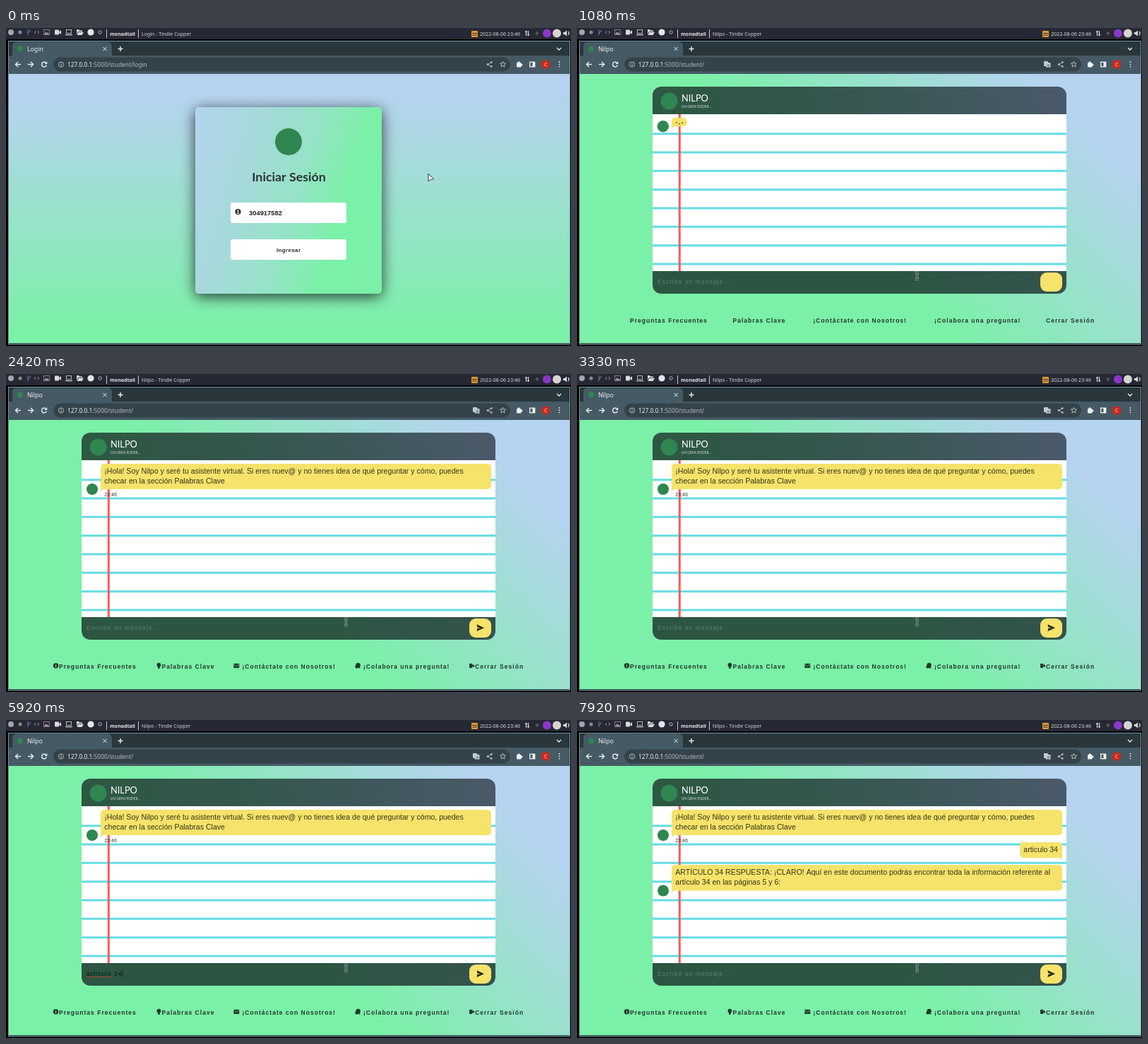
Write an HTML page with a canvas that moves like this. It is 800x450 px and loops after 8 s.

```html
<!DOCTYPE html>
<html lang="es">
<head>
<meta charset="utf-8">
<title>Chat</title>
<style>
html, body { margin: 0; width: 100%; height: 100%; overflow: hidden; background: #000; }
canvas { display: block; width: 100vw; height: 100vh; }
</style>
</head>
<body>
<canvas id="stage" width="800" height="450"></canvas>
<script>
const ctx = document.getElementById('stage').getContext('2d');
const LOOP = 8000;
const SANS = '"Liberation Sans", Arial, sans-serif';
const UI = '"Noto Sans", sans-serif';
const HAND = 'Lato, sans-serif';
const GREEN = '#7bf0a8', BLUE = '#b6d3ef', YELLOW = '#f5e36b', LOGO = '#2f8650', INK = '#20382c';
const BOT = 'Nilpo', BROWSER = 'Tindle Copper';

// Scene times in ms
const T = { page: 670, loader: 920, icons: 1250, hello: 1920, focus: 2580, send: 6000, wait: 6120, reply: 6550 };
const TYPED = 'articulo 34';
const KEYS = [3420, 3740, 5000, 5080, 5170, 5250, 5330, 5420, 5500, 5580, 5700];

// Elastic pop of a new bubble: [progress, scale]
const POP = [[0, 0], [.047, .45], [.094, .883], [.141, 1.141], [.187, 1.212], [.243, 1.151],
  [.299, 1.048], [.355, .979], [.41, .961], [.52, .991], [.63, 1.007], [.855, .999], [1, 1]];

function pop(age) {
  const p = Math.min(age / 500, 1);
  const i = Math.max(1, POP.findIndex(k => k[0] >= p));
  const [a, u] = POP[i - 1], [b, v] = POP[i];
  return u + (v - u) * (p - a) / (b - a);
}

function rect(x, y, w, h, fill, r = 0) {
  ctx.fillStyle = fill;
  ctx.beginPath();
  ctx.roundRect(x, y, w, h, r);
  ctx.fill();
}

function dot(x, y, r, fill) {
  ctx.fillStyle = fill;
  ctx.beginPath();
  ctx.arc(x, y, r, 0, 7);
  ctx.fill();
}

function ring(x, y, r, color, width = 1) {
  ctx.strokeStyle = color;
  ctx.lineWidth = width;
  ctx.beginPath();
  ctx.arc(x, y, r, 0, 7);
  ctx.stroke();
}

function trace(points) {
  ctx.beginPath();
  for (let i = 0; i < points.length; i += 2) ctx.lineTo(points[i], points[i + 1]);
}

function poly(points, fill) {
  trace(points);
  ctx.fillStyle = fill;
  ctx.fill();
}

function line(points, color, width = 1) {
  trace(points);
  ctx.strokeStyle = color;
  ctx.lineWidth = width;
  ctx.stroke();
}

function text(str, x, y, font, fill, spacing = 0) {
  ctx.font = font;
  ctx.letterSpacing = spacing + 'px';
  ctx.fillStyle = fill;
  ctx.fillText(str, x, y);
  const width = ctx.measureText(str).width;
  ctx.letterSpacing = '0px';
  return width;
}

function gradient(x0, y0, x1, y1, stops) {
  const g = ctx.createLinearGradient(x0, y0, x1, y1);
  stops.forEach(([p, c]) => g.addColorStop(p, c));
  return g;
}

function drawBar(title) {
  const grey = '#b4b7c0', pale = '#d9dbe0';
  rect(0, 0, 800, 16, '#262833');
  dot(7, 6, 4, '#a3a6ae');
  dot(20, 6, 2.6, '#85888f');
  line([31, 2, 31, 10], '#6f86bb');
  line([31, 7, 34, 5, 34, 3], '#6f86bb');
  line([42, 4, 40.5, 6, 42, 8], grey, .8);
  line([45, 4, 46.5, 6, 45, 8], grey, .8);
  ctx.strokeStyle = '#9d8f9c';
  ctx.strokeRect(53.5, 2.5, 8, 7);
  poly([54, 9, 56.5, 5, 58, 7, 59, 6, 61, 9], '#9d8f9c');
  rect(69, 2.5, 6, 7, pale, 1);
  poly([75, 5.5, 78, 3, 78, 9, 75, 6.5], pale);
  ctx.strokeStyle = pale;
  ctx.strokeRect(85.5, 2.5, 7, 5);
  rect(84, 9, 10, 1.2, pale);
  poly([100, 2, 103, 2, 104, 3.5, 108, 3.5, 108, 5, 102, 5, 100, 9], pale);
  poly([102.5, 5.8, 110, 5.8, 107.5, 10, 100.5, 10], pale);
  dot(120, 6, 4.6, '#e4e5e8');
  ring(133, 6, 2.2, grey);
  line([142.5, 2, 142.5, 14], '#c9cbd0');
  text('monadtall', 147, 10.5, 'bold 7px ' + UI, '#e4e5e8');
  line([187.5, 2, 187.5, 14], '#c9cbd0');
  text(title + ' - ' + BROWSER, 192, 10.5, '7px ' + UI, '#d3d5da');

  rect(659, 4, 9, 9, '#d99a3c', 1);
  rect(660, 7, 7, 1, '#4a3520');
  rect(660, 9.5, 7, 1, '#4a3520');
  text('2022-08-06 23:46', 671, 10.5, '7.1px ' + UI, '#d9dbe0');
  line([736.5, 11, 736.5, 5], pale, 1.2);
  poly([734.5, 6, 736.5, 3.5, 738.5, 6], pale);
  line([739.5, 4, 739.5, 10], pale, 1.2);
  poly([737.8, 9, 739.5, 11.5, 741.5, 9], pale);
  dot(752, 7.5, 2.4, '#50535e');
  dot(766, 7.5, 6, '#8937c8');
  dot(780, 7.5, 6, '#d7d5d2');
  poly([789, 6, 791, 6, 794, 3.5, 794, 11.5, 791, 9, 789, 9], pale);
  ctx.strokeStyle = pale;
  ctx.beginPath();
  ctx.arc(794, 7.5, 3, -1, 1);
  ctx.stroke();
}

function drawBrowser(tab, path, translate) {
  const white = '#eef2f3', soft = '#c0cacf';
  rect(3, 18, 796, 430, '#7398a8');
  rect(4, 19, 794, 428, '#29373d');
  rect(9, 19.5, 141, 24, '#455a64', [6, 6, 0, 0]);
  rect(4, 39, 794, 26, '#455a64');
  dot(20, 29.5, 4, LOGO);
  text(tab, 30, 32.5, '8.7px ' + UI, white);
  line([137.5, 27, 142.5, 32], white);
  line([142.5, 27, 137.5, 32], white);
  line([158.5, 29.5, 165.5, 29.5], white, 1.4);
  line([162, 26, 162, 33], white, 1.4);
  line([780, 28, 783, 31, 786, 28], white, 1.3);

  line([21, 51.5, 13.5, 51.5], white, 1.4);
  line([17, 48, 13.5, 51.5, 17, 55], white, 1.4);
  line([31, 51.5, 38.5, 51.5], white, 1.4);
  line([35, 48, 38.5, 51.5, 35, 55], white, 1.4);
  ctx.beginPath();
  ctx.arc(54, 51.5, 3.4, .3, 5.4);
  ctx.stroke();
  poly([58.2, 47.2, 58.2, 51, 54.4, 51], white);

  rect(67, 41.5, 647, 20, '#34434a', 10);
  ring(78, 51.5, 3.6, soft, .9);
  rect(77.5, 51, 1, 2.6, soft);
  rect(77.5, 49.2, 1, 1, soft);
  const host = text('127.0.0.1', 87, 54.5, '8.35px ' + UI, white);
  text(':5000' + path, 87 + host, 54.5, '8.35px ' + UI, '#b0bbc0');

  if (translate) {
    rect(661, 47, 6, 7, soft, 1);
    rect(664, 49, 6.5, 7, soft, 1);
    text('文', 664.8, 54.5, '5px "Noto Sans CJK SC", "Noto Sans CJK", sans-serif', '#34434a');
  }
  line([687.5, 48.5, 682, 51.5, 687.5, 54.5], soft, .9);
  dot(687.3, 48.5, 1.3, soft);
  dot(682, 51.5, 1.3, soft);
  dot(687.3, 54.5, 1.3, soft);
  const star = [];
  for (let i = 0; i <= 10; i++) {
    const r = i % 2 ? 1.9 : 4.2, a = i * Math.PI / 5 - Math.PI / 2;
    star.push(703.5 + r * Math.cos(a), 51.5 + r * Math.sin(a));
  }
  line(star, soft, .9);
  rect(723, 49, 6.5, 6.5, white, 1);
  dot(726, 48.7, 1.5, white);
  dot(730, 52, 1.5, white);
  ctx.strokeStyle = white;
  ctx.lineWidth = 1.3;
  ctx.strokeRect(741.7, 48.2, 7, 6.6);
  rect(745.5, 48, 3.5, 7, white);
  dot(764, 51.5, 6.2, '#cb2a1c');
  text('C', 761.9, 54, '7px ' + UI, '#f5dfdc');
  for (let y = 48; y < 56; y += 3.3) dot(783.5, y, .9, white);
}

function drawLogin() {
  rect(4, 65, 794, 381, gradient(0, 65, 0, 446, [[0, BLUE], [.08, BLUE], [.95, GREEN], [1, GREEN]]));
  ctx.save();
  ctx.shadowColor = 'rgba(0,0,0,.75)';
  ctx.shadowBlur = 20;
  ctx.shadowOffsetY = 4;
  rect(268, 112, 264, 264, gradient(268, 132, 526, 210,
    [[0, '#b2d4ec'], [.35, '#a5dad9'], [.62, '#95e3c6'], [.87, GREEN], [1, GREEN]]), 5);
  ctx.restore();
  dot(400, 161, 19, LOGO);
  ctx.textAlign = 'center';
  text('Iniciar Sesión', 400.5, 216.5, 'bold 17.8px ' + HAND, '#2c3337');
  ctx.textAlign = 'left';
  rect(318, 247, 164, 29, '#fff', 3);
  rect(318, 299, 164, 29, '#fff', 3);
  dot(328.5, 260, 4, '#222');
  dot(328.5, 258.8, 1.3, '#fff');
  poly([326.2, 262.4, 327.2, 261, 329.8, 261, 330.8, 262.4], '#fff');
  text('304917582', 344, 264.5, 'bold 9.4px ' + SANS, '#222');
  text('Ingresar', 383, 316.5, 'bold 8px ' + SANS, '#2b2b2b', .35);
}

// A chat bubble with its small tail; (x, y) is its top left corner
function bubble(age, b) {
  const s = pop(age), right = b.side === 'right';
  const ox = right ? b.x + b.w : b.x;
  ctx.save();
  ctx.translate(ox, b.y);
  ctx.scale(s, s);
  ctx.translate(-ox, -b.y);
  const bottom = b.y + b.h;
  rect(b.x, b.y, b.w, b.h, YELLOW, right ? [5, 5, 0, 5] : [5, 5, 5, 0]);
  if (right) {
    poly([ox, bottom - 1, ox, bottom + 3, ox - 4, bottom - 1], YELLOW);
  } else {
    poly([b.x, bottom - 1, b.x, bottom + 3, b.x + 4, bottom - 1], YELLOW);
    dot(122, bottom, 8, LOGO);
  }
  (b.lines || []).forEach((str, i) =>
    text(str, b.x + 5.3, b.y + 13.8 + i * 14.6, '10.55px ' + SANS, '#3a3415'));
  if (b.time) text(b.time, 139.3, bottom + 10, '7px ' + SANS, '#333');
  if (b.dots) {
    for (let i = 0; i < 3; i++) {
      const lift = Math.abs(Math.sin((age - i * 150) / 450 * Math.PI / 2));
      dot(b.x + 7 + i * 4, b.y + 8.5 - 3 * lift, .9, '#4a4420');
    }
  }
  ctx.restore();
}

function drawChat(t) {
  const loader = y => ({ x: 134, y, w: 21, h: 12, dots: true });
  if (t >= T.hello) {
    bubble(t - T.hello, { x: 134, y: 127, w: 553, h: 36, time: '23:46', lines: [
      `¡Hola! Soy ${BOT} y seré tu asistente virtual. Si eres nuev@ y no tienes idea de qué preguntar y cómo, puedes`,
      'checar en la sección Palabras Clave'] });
  } else if (t >= T.loader) {
    bubble(t - T.loader, loader(127));
  }
  if (t >= T.send) bubble(t - T.send, { x: 627, y: 173, w: 60, h: 22, side: 'right', lines: [TYPED] });
  if (t >= T.reply) {
    bubble(t - T.reply, { x: 134, y: 205, w: 553, h: 36.5, lines: [
      'ARTÍCULO 34 RESPUESTA: ¡CLARO! Aquí en este documento podrás encontrar toda la información referente al',
      'artículo 34 en las páginas 5 y 6:'] });
  } else if (t >= T.wait) {
    bubble(t - T.wait, loader(205));
  }
}

function drawInput(t) {
  const font = '8.5px ' + SANS;
  const count = t < T.send ? KEYS.filter(k => k <= t).length : 0;
  let end = 114;
  if (count) end += text(TYPED.slice(0, count), 114, 362, font, '#0b130f', 1.03);
  else text('Escribe un mensaje...', 114, 362, font, '#667f72', 1.03);
  if (count > 8) {
    const wave = [];
    for (let x = 114; x <= 149; x++) wave.push(x, 363.6 + (x % 2 ? .5 : -.5));
    line(wave, '#c5392f', .9);
  }
  const last = count ? KEYS[count - 1] : T.focus;
  if (t >= T.focus && t < T.send && (t - last) % 1000 < 500) rect(end, 354, .8, 9.5, '#0b130f');
}

function drawLinks(icons) {
  [[75, 'Preguntas Frecuentes'], [220.5, 'Palabras Clave'], [334.5, '¡Contáctate con Nosotros!'],
    [506, '¡Colabora una pregunta!'], [664, 'Cerrar Sesión']].forEach(([x, str]) =>
    text(str, x, 417, 'bold 8.5px ' + SANS, INK, 1.03));
  if (!icons) return;
  dot(70.5, 412.8, 3.7, INK);
  rect(70, 412, 1.1, 3, GREEN);
  rect(70, 410.2, 1.1, 1.1, GREEN);
  dot(216.4, 411.7, 2.9, INK);
  rect(215, 414, 2.8, 3, INK, 1);
  rect(322.3, 409.8, 8, 6.2, INK, 1);
  line([322.5, 411, 326.3, 413.8, 330, 411], GREEN, .7);
  dot(498.6, 412, 3.2, INK);
  dot(496.5, 414.3, 2.2, INK);
  poly([500, 414, 502, 416.5, 497, 416], INK);
  rect(656, 409.7, 4, 6.4, INK, 1);
  rect(658, 412, 3, 1.8, INK);
  poly([660.7, 410.3, 663.6, 412.9, 660.7, 415.5], INK);
}

function drawStudent(t) {
  // 45 degree gradient across the page
  const cx = 401, cy = 255.5, d = 294;
  rect(4, 65, 794, 381, gradient(cx - d, cy + d, cx + d, cy - d,
    [[0, GREEN], [.46, GREEN], [.87, BLUE], [1, BLUE]]));
  ctx.save();
  ctx.beginPath();
  ctx.roundRect(107, 83, 586, 293, 12);
  ctx.clip();
  rect(107, 83, 586, 293, '#fff');
  for (let i = 0; i < 8; i++) rect(107, 148.2 + i * 26.33, 586, 3, '#66dce3');
  rect(143.8, 122, 3, 222, '#fa5a5c');
  drawChat(t);
  rect(107, 83, 586, 39, gradient(107, 122, 693, 83,
    [[0, '#2d5842'], [.35, '#33564b'], [1, '#4a596a']]));
  rect(107, 344, 586, 32, gradient(107, 0, 693, 0, [[0, '#2c5641'], [.6, '#2c5642'], [1, '#34534d']]));
  ctx.restore();
  dot(130.5, 103.5, 12, LOGO);
  text(BOT.toUpperCase(), 148, 103.5, '12.8px ' + HAND, '#fff');
  text('UN GRAN PODER...', 148, 112.5, '4.7px ' + HAND, '#d5e0dc');
  drawInput(t);
  rect(656, 346, 31, 27, YELLOW, 9);
  const icons = t >= T.icons;
  if (icons) poly([666.5, 354.3, 677, 359.2, 666.5, 364, 667.3, 360, 672, 359.2, 667.3, 358.3], '#28271c');
  drawLinks(icons);
}

function drawArrow(x, y) {
  const shape = [0, 0, 0, 10.5, 2.6, 8.4, 7.5, 7.2].map((v, i) => v + (i % 2 ? y : x));
  poly(shape, '#fff');
  line([...shape, x, y, x, y + 1], '#333', 1);
}

function drawBeam(x, y) {
  for (const [color, w] of [['rgba(255,255,255,.8)', 2.2], ['#222', 1]]) {
    line([x - 2.5, y - 4.5, x + 2.5, y - 4.5], color, w);
    line([x, y - 4.5, x, y + 4.5], color, w);
    line([x - 2.5, y + 4.5, x + 2.5, y + 4.5], color, w);
  }
}

function drawPointer(t) {
  const ease = (a, b) => {
    const p = Math.min(Math.max((t - a) / (b - a), 0), 1);
    return p * p * (3 - 2 * p);
  };
  const go = ease(80, 420), drop = ease(670, 900);
  const x = 598 - 127 * go + 10.5 * drop, y = 206.5 + 111 * go + 33.5 * drop;
  if (t < T.page) drawArrow(x, y);
  else drawBeam(x, y);
}

function draw(t) {
  const login = t < T.page, title = login ? 'Login' : BOT;
  rect(0, 0, 800, 450, '#000');
  drawBar(title);
  drawBrowser(title, login ? '/student/login' : '/student/', !login);
  if (login) drawLogin();
  else drawStudent(t);
  drawPointer(t);
}

const start = performance.now();
function frame() {
  draw((performance.now() - start) % LOOP);
  requestAnimationFrame(frame);
}
frame();
</script>
</body>
</html>
```
